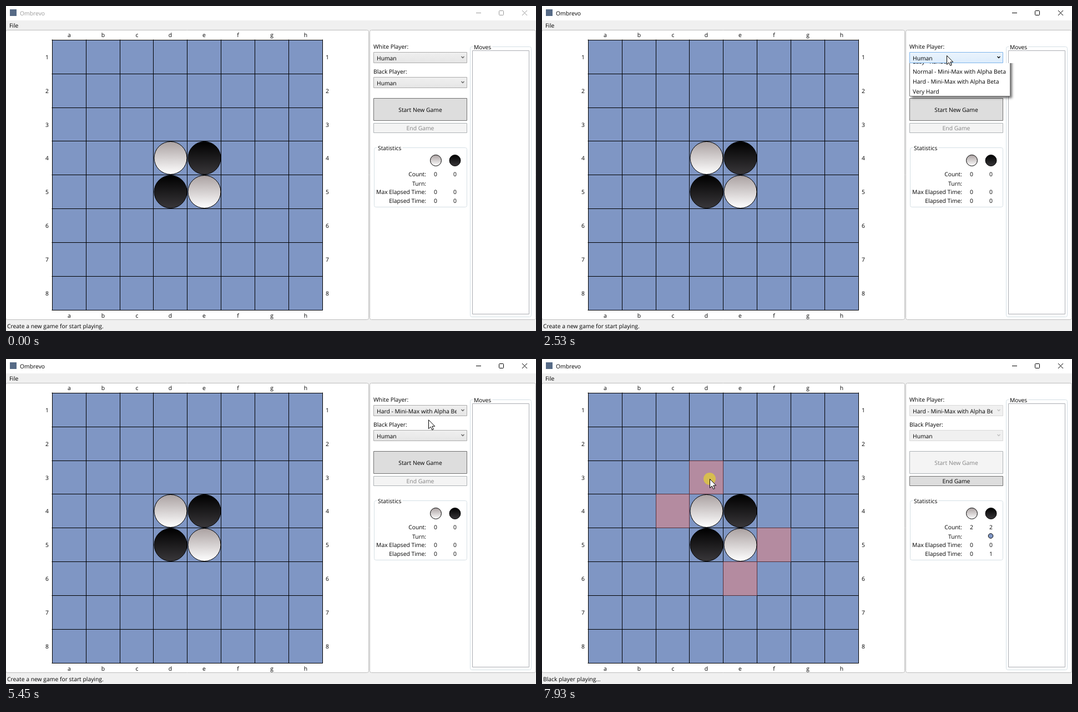
Recreate the animation shown at these times as an HTML page with a canvas. Size 955 px wide and 586 px high, loop 8 s.

```html
<!DOCTYPE html>
<html lang="en">
<head>
<meta charset="utf-8">
<title>Ombrevo</title>
<style>
html, body { margin: 0; width: 100%; height: 100%; overflow: hidden; }
canvas { display: block; }
</style>
</head>
<body>
<canvas id="stage" width="955" height="586"></canvas>
<script>
const g = document.getElementById('stage').getContext('2d');
const LOOP = 8000, STEP = 69;
const BLUE = '#7f96c4';
const ACTIVATE = 1700, OPEN = 2390, SLIDE = 210, CLOSE = 4440, START = 6550, SECOND = 7550;

// Cursor moves in bursts, each sampled at a steady step.
const bursts = [0, 200, 1030, 1430, 2320, 3480, 4370, 5240, 6280, START];
const path = [
  [200, 859, 557], [410, 750, 390], [600, 622, 217], [700, 652, 182], [815, 702, 144],
  [1030, 702, 144], [1160, 716, 96], [1430, 716, 96], [ACTIVATE, 736, 62], [2150, 729, 89],
  [2600, 729, 89], [3070, 728, 143], [3150, 727, 143], [3479, 728, 146], [4025, 726, 165],
  [5240, 726, 165], [5500, 770, 95], [5860, 764, 172], [6060, 756, 183], [START, 756, 183],
  [6950, 570, 228], [7310, 395, 224], [7700, 308, 213], [7860, 302, 216]
];
const clicks = [[ACTIVATE, 1840], [2320, 2460], [4370, CLOSE], [6280, 6350], [7925, LOOP]];
const players = ['Human', 'Easy - Random', 'Normal - Mini-Max with Alpha Beta',
  'Hard - Mini-Max with Alpha Beta', 'Very Hard'];

function cursorAt(t) {
  const i = path.findIndex(p => p[0] > t);
  if (i < 0) return path[path.length - 1].slice(1);
  if (i === 0) return null;
  const [a, b] = [path[i - 1], path[i]], k = (t - a[0]) / (b[0] - a[0]);
  return [1, 2].map(n => a[n] + (b[n] - a[n]) * k);
}

function text(s, x, mid, align = 'left', color = '#000') {
  g.fillStyle = color;
  g.textAlign = align;
  g.fillText(s, x, mid + 4);
}

function box(x, y, r, b, fill, stroke, radius = 0) {
  g.beginPath();
  g.roundRect(x + .5, y + .5, r - x - 1, b - y - 1, radius);
  if (fill) { g.fillStyle = fill; g.fill(); }
  if (stroke) { g.strokeStyle = stroke; g.stroke(); }
}

function line(color, ...p) {
  g.strokeStyle = color;
  g.beginPath();
  for (let i = 0; i < p.length; i += 2) g.lineTo(p[i], p[i + 1]);
  g.stroke();
}

function shade(y, b, top, bottom) {
  const s = g.createLinearGradient(0, y, 0, b);
  s.addColorStop(0, top);
  s.addColorStop(1, bottom);
  return s;
}

function circle(x, y, r, fill, stroke) {
  g.beginPath();
  g.arc(x, y, r, 0, 7);
  g.fillStyle = fill;
  g.fill();
  if (stroke) { g.strokeStyle = stroke; g.stroke(); }
}

function disc(x, y, r, white) {
  const [top, bottom] = white ? ['#aaa1a1', '#ffffff'] : ['#000000', '#39373a'];
  circle(x, y, r, shade(y - r, y + r, top, bottom), '#000');
}

function group(x, y, r, b, label) {
  box(x, y, r, b, null, '#d5dfe5', 3);
  g.fillStyle = '#fff';
  g.fillRect(x + 5, y - 4, g.measureText(label).width + 4, 9);
  text(label, x + 7, y + .5);
}

function frameWindow(active, playing) {
  g.fillStyle = '#f0f0f0';
  g.fillRect(0, 0, 955, 586);
  g.fillStyle = '#fff';
  g.fillRect(0, 0, 955, 26);
  g.fillStyle = '#566a86';
  g.fillRect(7, 6, 12, 12);
  const ink = active ? '#000' : '#999';
  text('Ombrevo', 25, 12.5, 'left', ink);
  line(ink, 847, 12.5, 856, 12.5);
  box(888, 8, 897, 17, null, ink, 1);
  line(ink, 930, 8, 939, 17);
  line(ink, 939, 8, 930, 17);
  text('File', 6, 35);
  box(-1, 43, 654, 566, '#fff', '#bdbdbd', 3);
  box(655, 43, 955, 566, '#fff', '#bdbdbd', 3);
  text(playing ? 'Black player playing...' : 'Create a new game for start playing.', 2, 576.5);
}

function board(playing) {
  const at = (o, i) => Math.round(o + i * 60.95);
  g.fillStyle = BLUE;
  g.fillRect(83, 61, 488, 488);
  for (let i = 0; i <= 8; i++) {
    const x = at(82.6, i) + .5, y = at(60.6, i) + .5;
    line('#000', x, 60.5, x, 548.5);
    line('#000', 82.5, y, 570.5, y);
    if (i === 8) break;
    for (const mid of [52, 558]) text('abcdefgh'[i], x + 30.5, mid, 'center');
    for (const mid of [74, 579]) text(i + 1, mid, y + 30.5, 'center');
  }
  if (playing) for (const [c, r] of [[3, 2], [2, 3], [5, 4], [4, 5]])
    box(at(82.6, c), at(60.6, r), at(82.6, c + 1) + 1, at(60.6, r + 1) + 1, '#b48ba0', '#55303a');
  for (const c of [0, 1]) for (const r of [0, 1])
    disc(296.5 + c * 61, 274 + r * 61, 29.5, c === r);
}

function combo(y, value, hover, disabled) {
  const fill = disabled ? '#f0f0f0'
    : hover ? shade(y, y + 20, '#ebf4fc', '#dcecfc') : shade(y, y + 20, '#f0f0f0', '#e5e5e5');
  box(662, y, 831, y + 20, fill, disabled ? '#d9d9d9' : hover ? '#7eb4ea' : '#acacac');
  g.save();
  g.beginPath();
  g.rect(662, y, 150, 20);
  g.clip();
  text(value, 668, y + 10.5);
  g.restore();
  g.lineWidth = 1.3;
  line(disabled ? '#bfbfbf' : hover ? '#000' : '#606060', 820.5, y + 8, 823, y + 10.5, 825.5, y + 8);
  g.lineWidth = 1;
}

function button(y, b, label, enabled, hover, pressed) {
  const [fill, edge] = !enabled ? ['#f4f4f4', '#adb2b5']
    : pressed ? ['#c4e5f6', '#2c628b'] : hover ? ['#bee6fd', '#3c7fb1'] : ['#dddddd', '#707070'];
  box(662, y, 831, b, fill, edge);
  text(label, 746.5, (y + b) / 2, 'center', enabled ? '#000' : '#838383');
}

function statistics(playing, t) {
  group(663, 255, 831, 363, 'Statistics');
  disc(774.5, 278.5, 10, true);
  disc(809, 278.5, 10, false);
  const count = playing ? 2 : 0;
  const rows = [['Count:', 303, count, count], ['Turn:', 319.5, '', ''],
    ['Max Elapsed Time:', 335, 0, 0], ['Elapsed Time:', 350.5, 0, t >= SECOND ? 1 : 0]];
  for (const [label, y, white, black] of rows) {
    text(label, 757, y, 'right');
    text(white, 774, y, 'center');
    text(black, 809, y, 'center');
  }
  if (playing) circle(808.5, 319, 4.3, BLUE, '#000');
}

function popup(t, y) {
  const shift = 92 * (Math.min(1, (t - OPEN) / SLIDE) - 1);
  const top = 103 + shift, rowH = 18.2;
  const hot = y > 104 ? Math.min(4, Math.floor((y - top - 1) / rowH)) : 0;
  g.save();
  g.beginPath();
  g.rect(655, 103, 300, 200);
  g.clip();
  g.save();
  g.shadowColor = 'rgba(0,0,0,.55)';
  g.shadowBlur = 4;
  g.shadowOffsetX = g.shadowOffsetY = 3;
  box(662, top, 844, top + 92, '#fff');
  g.restore();
  box(662, top, 844, top + 92, '#fff', '#777');
  players.forEach((name, i) => {
    const a = top + 1 + i * rowH;
    if (i === hot && y > 104) box(663, a, 843, a + rowH, '#b5dff5', '#3fa9dc');
    else if (i === 0) box(663, a, 843, a + rowH, '#f5f5f5', '#dddddd');
    text(name, 668, a + 9.5);
  });
  g.restore();
}

function cursor(x, y, pressed) {
  if (pressed) circle(x, y, 11, 'rgba(221,198,66,.85)');
  const tip = [0, 0, 0, 16, 3.7, 12.5, 6.2, 18, 8.7, 17, 6.3, 11.5, 11.2, 11.5];
  g.beginPath();
  for (let i = 0; i < tip.length; i += 2) g.lineTo(x + .5 + tip[i], y + .5 + tip[i + 1]);
  g.closePath();
  g.fillStyle = '#fff';
  g.fill();
  g.strokeStyle = '#000';
  g.stroke();
}

function draw(now) {
  const time = now % LOOP;
  const from = bursts.filter(b => b <= time).pop();
  const t = from + Math.floor((time - from) / STEP) * STEP;
  const playing = t >= START, open = t >= OPEN && t < CLOSE;
  const pos = cursorAt(t), [x, y] = pos || [-99, -99];
  const pressed = clicks.some(([a, b]) => t >= a && t < b);
  const over = (top, bottom) => x >= 662 && x < 831 && y >= top && y < bottom;

  g.font = '10.35px "Open Sans", "Noto Sans", sans-serif';
  g.textRendering = 'geometricPrecision';
  g.lineWidth = 1;
  frameWindow(t >= ACTIVATE, playing);
  board(playing);

  text('White Player:', 662, 72.5);
  combo(83, players[t >= CLOSE ? 3 : 0], over(83, 103), playing);
  text('Black Player:', 662, 118);
  combo(128, players[0], !open && over(128, 148), playing);
  button(166, 207, 'Start New Game', !playing, !open && over(166, 207), pressed && over(166, 207));
  button(211, 229, 'End Game', playing, over(211, 229));
  statistics(playing, t);
  group(836, 73, 947, 561, 'Moves');
  box(840, 80, 943, 556, '#fff', '#abadb3');

  if (open) popup(t, y);
  if (pos) cursor(x, y, pressed);
  requestAnimationFrame(() => draw(performance.now() - began));
}

const began = performance.now();
draw(0);
</script>
</body>
</html>
```
